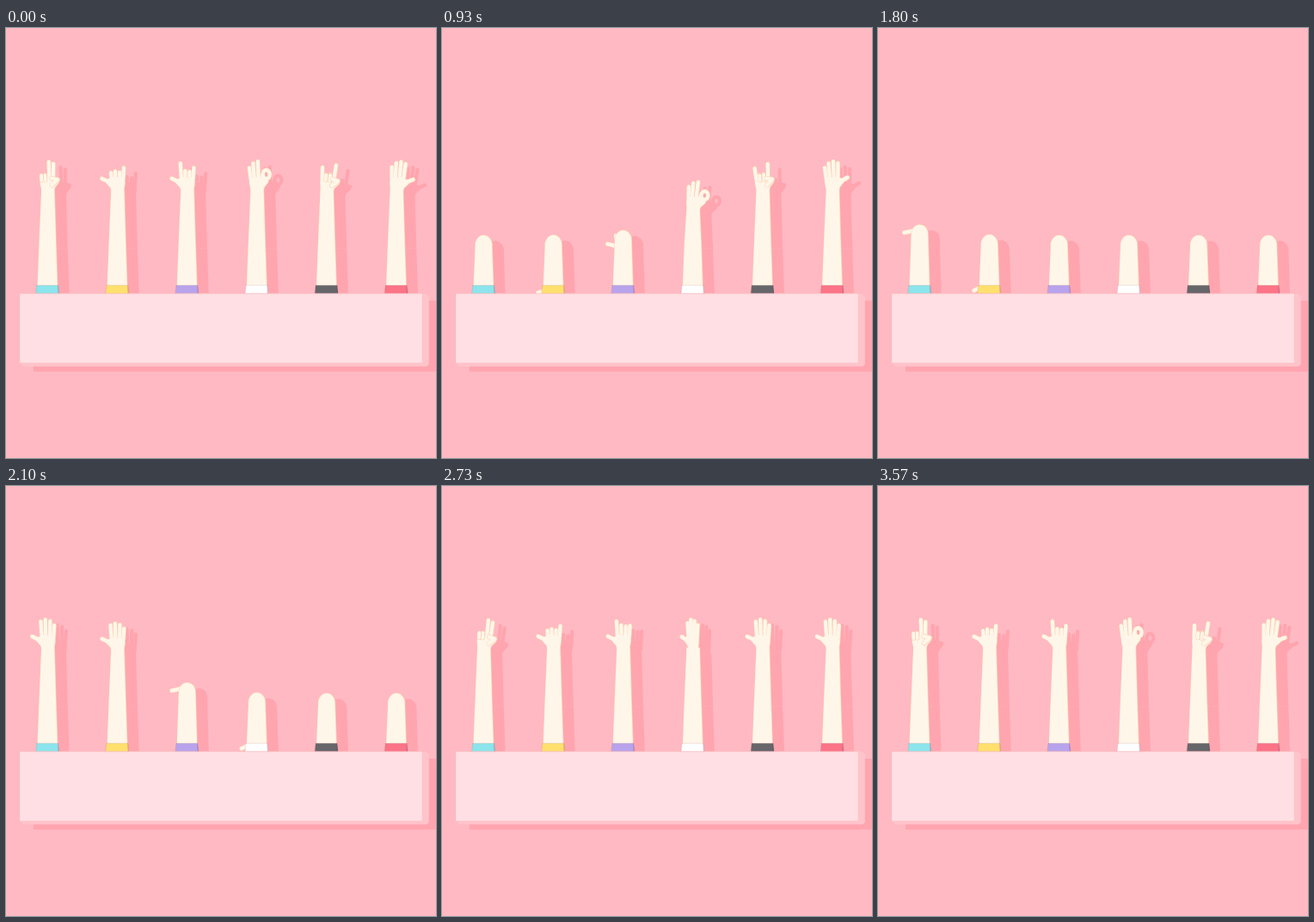
An HTML page with a canvas for the animation above (3.6 s loop, 500 by 500 pixels).

```html
<!DOCTYPE html>
<html lang="en">
<head>
<meta charset="utf-8">
<title>Hand signs</title>
<style>
html, body { margin: 0; width: 100%; height: 100%; overflow: hidden; background: #ffb9c2; }
canvas { display: block; }
</style>
</head>
<body>
<canvas id="stage" width="500" height="500"></canvas>
<script>
const ctx = document.getElementById('stage').getContext('2d');
const LOOP = 3600, STAGGER = 150, HINGE = 250, FOREARM = 62;
const SKIN = '#fff6ea', EDGE = '#f8d0ae', PALM = '#fcdcc4', SHADOW = '#ffa5af';

// Hand geometry relative to the wrist, thumb on the left; index to pinky
const BASES = [[-7.2, -15], [-2.5, -16], [2.4, -15.5], [6.6, -13.5]];
const TIPS = [[-8.3, -30.5], [-3, -32.7], [2.6, -31], [7.4, -26]];
const PALM_SHAPE = [[-7, 2], [-8.6, -7], [-9, -15.5], [8.4, -14], [8.4, -7], [7, 2]];
const THENAR = [[-6.8, 2], [-8.5, -2.5], [-13.5, -8], [-13, -11.5], [-8.5, -13.5], [0, -8]];
const THUMBS = {
  out: [[-4, -5], [-11, -9.5], [-18.2, -13]],
  tuck: [[-5, -5], [-12, -11], [-5, -13]],
  ring: [[-4, -5], [-9, -8], [-12, -11.5]]
};
const SIGNS = [
  { cuff: '#8ce4ec', flip: 1, reach: [.95, .97, .1, .1], thumb: 'tuck', sway: 4 },
  { cuff: '#ffe06e', flip: 0, reach: [.3, .32, .3, .95], thumb: 'out', sway: 1 },
  { cuff: '#b9a3ec', flip: 0, reach: [1, .35, .35, .95], thumb: 'out', sway: 1 },
  { cuff: '#ffffff', flip: 1, reach: [.1, 1, 1, 1], thumb: 'ring', sway: -5 },
  { cuff: '#66666b', flip: 1, reach: [.92, .1, .1, .95], thumb: 'tuck', sway: 5 },
  { cuff: '#fb7488', flip: 1, reach: [1, 1, 1, 1], thumb: 'out', sway: 4 }
];

const mix = (a, b, p) => a + (b - a) * p;
const mixPoint = (a, b, p) => [mix(a[0], b[0], p), mix(a[1], b[1], p)];
const ramp = (t, from, to) => Math.min(1, Math.max(0, (t - from) / (to - from)));
const smooth = p => p * p * (3 - 2 * p);

function trace(points, closed) {
  ctx.beginPath();
  points.forEach(p => ctx.lineTo(p[0], p[1]));
  if (closed) ctx.closePath();
}

// Paints parts as one silhouette, widened by grow
function paint(parts, color, grow) {
  ctx.fillStyle = ctx.strokeStyle = color;
  for (const { points, width = 0, closed, hollow } of parts) {
    trace(points, closed);
    if (closed && !hollow) ctx.fill();
    if (width + grow > 0) {
      ctx.lineWidth = width + grow;
      ctx.stroke();
    }
  }
}

function paintSkin(parts) {
  ctx.save();
  ctx.translate(.2, 0);
  paint(parts, EDGE, 1.1);
  ctx.restore();
  paint(parts, SKIN, 0);
}

function polygon(x, color, points) {
  trace(points.map(p => [x + p[0], p[1]]), true);
  ctx.fillStyle = color;
  ctx.fill();
}

function arc(cx, cy, rx, ry, from, to, steps) {
  return Array.from({ length: steps + 1 }, (_, i) => {
    const a = mix(from, to, i / steps);
    return [cx + rx * Math.cos(a), cy + ry * Math.sin(a)];
  });
}

function pose(i, time) {
  const sign = SIGNS[i], x = 48.3 + 81.1 * i;
  const t = (time - STAGGER * i + LOOP) % LOOP;
  const folding = t < 1200;
  const bend = Math.PI * (folding ? ramp(t, 325, 890) : 1 - ramp(t, 1535, 1985));
  const turn = t < 720 ? 1 : ramp(t, 2180, 2620);
  const p = smooth(turn);
  const held = t > 1800 ? t - LOOP : t;
  const angle = sign.sway * p * (1 - 2 * smooth(ramp(held, -600, 100))) * Math.PI / 180;
  const spin = sign.flip ? Math.cos(Math.PI * turn) : 1;
  const wristX = x + .4, wristY = HINGE - FOREARM * Math.cos(bend);
  // The hand trails behind the forearm in both directions
  const tilt = Math.cos(bend + (folding ? -.72 : .75) * Math.sin(bend));

  const place = (point, scale = spin) => {
    const px = point[0] * scale, py = point[1];
    return [
      wristX + px * Math.cos(angle) - py * Math.sin(angle),
      wristY + (px * Math.sin(angle) + py * Math.cos(angle)) * tilt
    ];
  };

  const palmScale = Math.sign(spin || 1) * Math.max(.8, Math.abs(spin));
  const palm = { points: PALM_SHAPE.map(q => place(q, palmScale)), closed: true };
  const thenar = { points: THENAR.map(q => place(q)), closed: true };
  const hand = [palm, thenar], curls = [];
  sign.reach.forEach((reach, n) => {
    const tip = mixPoint(BASES[n], TIPS[n], mix(1, reach, p));
    hand.push({ points: [place(BASES[n]), place(tip)], width: 4.2 });
    if (sign.flip && reach < .2 && p > .6 && sign.thumb !== 'ring') {
      const bx = BASES[n][0];
      curls.push({ points: [place([bx, -17]), place([bx, -11])], width: 3.8 });
    }
  });
  const thumb = {
    points: THUMBS.out.map((q, n) => place(mixPoint(q, THUMBS[sign.thumb][n], p))),
    width: 4.4
  };
  hand.push(thumb);
  if (sign.thumb === 'tuck' && p > .6) curls.push(thumb);
  if (sign.thumb === 'ring' && p > .3) {
    const loop = arc(-11.8, -17, 4 * p, 5.2 * p, 0, 2 * Math.PI, 16);
    hand.push({ points: loop.map(q => place(q)), width: 4, closed: true, hollow: true });
  }

  const forearm = {
    points: [[x - 9.7, HINGE], [wristX - 7.5, wristY], [wristX + 7.5, wristY], [x + 9.7, HINGE]],
    closed: true
  };
  const cap = 241 - 7.5 * (1 + Math.cos(bend)) ** 2;
  const stub = {
    points: [[x - 12, 309], ...arc(x + .1, cap + 11, 9.6, 11, Math.PI, 2 * Math.PI, 14), [x + 11.7, 309]],
    closed: true
  };
  const upper = {
    points: [[x - 12, 309], [x - 9.7, HINGE], [x + 9.7, HINGE], [x + 11.7, 309]],
    closed: true
  };
  const bent = bend > 1.13;
  return { x, hand, curls, palm, forearm, stub, upper, bent, folding, sign };
}

function drawArm(a) {
  if (a.bent) {
    paintSkin([a.forearm, ...a.hand]);
    if (a.folding) paint([a.palm, a.forearm], PALM, 0);
    paintSkin([a.stub]);
  } else {
    paintSkin([a.upper, a.forearm, ...a.hand]);
    a.curls.forEach(c => paintSkin([c]));
  }
}

function drawCuff({ x, sign }) {
  const shape = [[-12.7, 299.2], [12.4, 299.2], [13.4, 309], [-13.5, 309]];
  polygon(x, sign.cuff, shape);
  polygon(x, 'rgba(70,30,110,.2)', [[11.8, 299.2], [12.4, 299.2], [13.4, 309], [12, 309]]);
  trace(shape.map(p => [x + p[0], p[1]]), true);
  ctx.strokeStyle = 'rgba(140,90,70,.3)';
  ctx.lineWidth = .5;
  ctx.stroke();
}

function drawBox() {
  polygon(0, '#ffc4cb', [[16, 389], [20, 393.5], [489, 393.5], [491.8, 391], [491.8, 312], [488, 309], [16, 309]]);
  ctx.fillStyle = '#ffdfe4';
  ctx.fillRect(16, 308.8, 468.3, 81);
  ctx.strokeStyle = '#f9bdbc';
  ctx.lineWidth = .7;
  ctx.strokeRect(16, 308.8, 468.3, 81);
}

function draw(time) {
  ctx.fillStyle = '#ffb9c2';
  ctx.fillRect(0, 0, 500, 500);
  ctx.fillStyle = SHADOW;
  ctx.fillRect(32, 317, 468, 82.5);
  const arms = SIGNS.map((_, i) => pose(i, time));
  ctx.save();
  ctx.translate(13.8, 6.5);
  arms.forEach(a => paint([a.bent ? a.stub : a.upper, a.forearm, ...a.hand], SHADOW, 0));
  ctx.restore();
  arms.forEach(a => {
    drawArm(a);
    drawCuff(a);
  });
  drawBox();
}

ctx.lineCap = ctx.lineJoin = 'round';
const start = performance.now();
function tick() {
  draw((performance.now() - start) % LOOP);
  requestAnimationFrame(tick);
}
tick();
</script>
</body>
</html>
```
